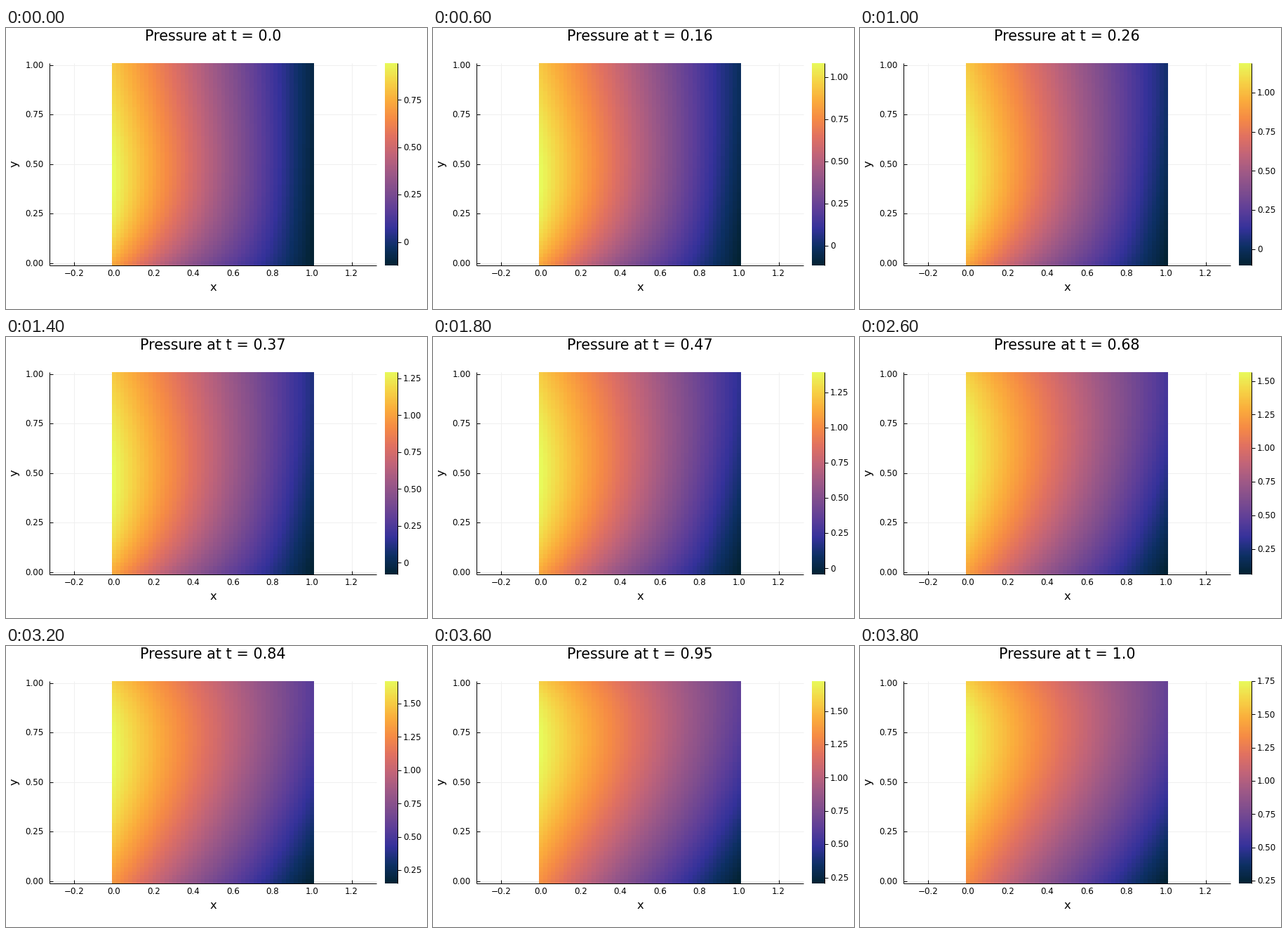
These frames come from a looping animation (600 px wide and 400 px high, 4 s). A matplotlib script:

```python
import numpy as np
import matplotlib.pyplot as plt
from matplotlib.animation import FuncAnimation
from matplotlib.colors import LinearSegmentedColormap

W, H, DPI = 600, 400, 100
FRAMES, INTERVAL = 20, 200
N = 50
SCALE, X0, Y0 = 282.2, 153.9, 334.8      # pixels per unit, pixel of (0, 0)
TOP, BOTTOM, LEFT, RIGHT = 49.7, 337.7, 62, 528
BAR_L, BAR_R = 540, 558

THERMAL = LinearSegmentedColormap.from_list("thermal", [
    "#042333", "#0d3064", "#35329b", "#5d3e99", "#7e4d8f", "#9e5987",
    "#c16479", "#e17161", "#f68b45", "#fbad3c", "#f6d346", "#e8fa5b"])

axis = np.linspace(0, 1, N)
X, Y = np.meshgrid(axis, axis)


def limits(t):
    """Lowest and highest pressure."""
    low = -.1226 + t**2 * (.12 + .765 * t - .531 * t**2)
    high = .945 + t * (.793 + .818 * t - 1.254 * t**2 + .45 * t**3)
    return low, high


def field(t):
    """Pressure scaled to 0..1: a bulging inlet falling to the outlet."""
    bottom, top = .82 - .06 * t, .90 - .12 * t + .16 * t**2
    skew = .6 - .3 * t - .8 * t**2
    bulge = .62 * Y * (1 - Y) * (1 + skew * (1 - 2 * Y))
    inlet = bottom + (top - bottom) * Y + bulge
    outlet = (.04 + .27 * t) * np.sin(np.pi * Y / 2)
    sag = .55 * (1 - .8 * t) * (1 - Y)**3 + .1 * t**2
    u = inlet + (outlet - inlet) * X - sag * X * (1 - X)**2
    return (u - u.min()) / (u.max() - u.min())


plt.rcParams["font.family"] = "DejaVu Sans"
fig = plt.figure(figsize=(W / DPI, H / DPI), dpi=DPI, facecolor="white")
ax = fig.add_axes([0, 0, 1, 1])
ax.axis("off")


def line(x, y, color="black", z=4):
    return ax.plot(x, y, color=color, lw=.72, zorder=z,
                   solid_capstyle="butt")[0]


def text(x, y, s, px=11.9, **kw):
    kw = {"ha": "center", "va": "baseline", **kw}
    return ax.text(x, y, s, fontsize=px * 72 / DPI, color="black", **kw)


def image(data, extent, **kw):
    return ax.imshow(data, cmap=THERMAL, vmin=0, vmax=1, aspect="auto",
                     interpolation="nearest", zorder=3, extent=extent, **kw)


for v in np.arange(-1, 7) / 5:
    x = X0 + v * SCALE
    line([x, x], [TOP, BOTTOM], "#efefef", 1)
    line([x, x], [BOTTOM, BOTTOM - 4.5], z=2)
    text(x, 353.4, f"{v:.1f}".replace("-", "\u2212"))
for v in np.arange(5) / 4:
    y = Y0 - v * SCALE
    line([LEFT, RIGHT], [y, y], "#efefef", 1)
    line([LEFT, LEFT + 4.5], [y, y])
    text(54, y + 4.2, f"{v:.2f}", ha="right")
line([LEFT, LEFT], [TOP, BOTTOM])
line([LEFT, RIGHT], [BOTTOM, BOTTOM])
text(295, 373.5, "x", 16.4)
text(12.5, 193.3, "y", 16.4, va="center", rotation=90)
title = text(295, 18.3, "", 20.8)

half = SCALE / (N - 1) / 2
heat = image(field(0), [X0 - half, X0 + SCALE + half,
                        Y0 + half, Y0 - SCALE - half], origin="lower")
image(np.linspace(1, 0, 256)[:, None], [BAR_L, BAR_R, BOTTOM, TOP])
line([BAR_R, BAR_R], [TOP, BOTTOM])
ticks = [(v, line([BAR_R, BAR_R + 5], [0, 0]),
          text(566, 0, f"{v:.2f}" if v else "0", ha="left"))
         for v in np.arange(8) / 4]
ax.set_xlim(0, W)
ax.set_ylim(H, 0)


def update(i):
    t = i / (FRAMES - 1)
    title.set_text(f"Pressure at t = {round(t, 2)}")
    heat.set_data(field(t))
    low, high = limits(t)
    for v, mark, label in ticks:
        y = BOTTOM - (v - low) / (high - low) * (BOTTOM - TOP)
        mark.set_ydata([y, y])
        label.set_y(y + 4.2)
        for part in (mark, label):
            part.set_visible(bool(low <= v <= high))
    return [title, heat]


anim = FuncAnimation(fig, update, frames=FRAMES, interval=INTERVAL,
                     repeat=True, repeat_delay=0, blit=False)
plt.show()
```
